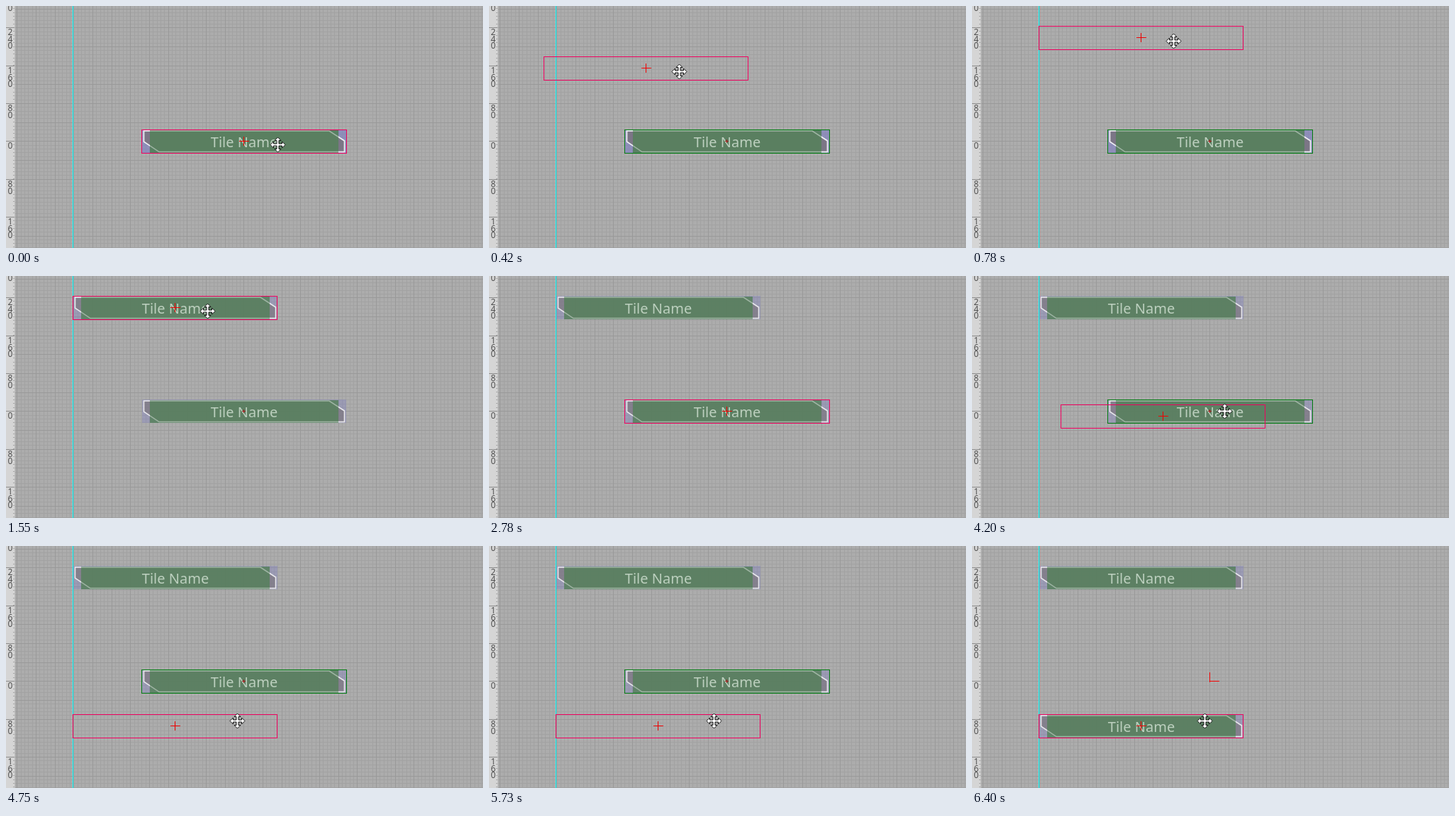
Write an HTML page with a canvas that moves like this. It is 673 px wide and 341 px high and loops after 6790 ms.

```html
<!DOCTYPE html>
<html lang="en">
<head>
<meta charset="utf-8">
<title>Snapping tiles to a guide</title>
<style>
html, body { margin: 0; width: 100%; height: 100%; overflow: hidden; background: #aaa; }
canvas { display: block; }
</style>
</head>
<body>
<canvas id="stage" width="673" height="341"></canvas>
<script>
const ctx = document.getElementById('stage').getContext('2d');
const W = 673, H = 341, LOOP = 6790;
const ORIGIN = { x: 335, y: 190 }, UNIT = 160 / 3, GUIDE = 94;
const HOME = { x: 191, y: 174, w: 289 };
const TOP = { x: GUIDE, y: 28, w: 288 };
const LOW = { x: GUIDE, y: 237, w: 288 };
const PINK = '#f0005f', GREEN = '#007c10', RED = '#f00000';

const linear = p => p;
const easeIn = q => p => p ** q;
const easeOut = q => p => 1 - (1 - p) ** q;
const overshoot = p => 1 + 3.4 * (p - 1) ** 3 + 2.4 * (p - 1) ** 2;

// Each move starts where the last one ended, unless it has its own "from"
const moves = [
  { start: 70, end: 780, from: [383, 195], to: [284, 49], easeX: overshoot, easeY: easeOut(2) },
  { start: 3170, end: 3450, from: [670, -2], to: [423, 182], easeX: easeOut(2), easeY: easeOut(2) },
  { start: 3910, end: 4750, to: [326, 246], easeX: easeOut(2.4), easeY: easeIn(2.2) },
  { start: 5130, end: 5270, to: [308, 246], easeX: linear, easeY: linear },
  { start: 5500, end: 6090, to: [328, 246], easeX: linear, easeY: linear }
];

// The pointer advances in jumps of about 70 ms
function pointerAt(t) {
  let [x, y] = moves[0].from;
  for (const { start, end, from = [x, y], to, easeX, easeY } of moves) {
    if (t < start) break;
    const jumps = Math.round((end - start) / 70);
    const done = Math.min(jumps, Math.floor((t - start) / (end - start) * jumps));
    const p = (done + 1) / (jumps + 1);
    x = Math.round(from[0] + (to[0] - from[0]) * easeX(p));
    y = Math.round(from[1] + (to[1] - from[1]) * easeY(p));
  }
  return { x, y };
}

function dragBox(pointer, grabX, grabY) {
  const x = pointer.x - grabX;
  return { x: Math.abs(x - GUIDE) < 17 ? GUIDE : x, y: pointer.y - grabY, w: 288 };
}

function fill(color, x, y, w, h) {
  ctx.fillStyle = color;
  ctx.fillRect(x, y, w, h);
}

function gridLines(step, color) {
  const first = o => (o + .3) % step;
  for (let x = first(ORIGIN.x); x < W; x += step) fill(color, Math.round(x), 0, 1, H);
  for (let y = first(ORIGIN.y); y < H; y += step) fill(color, 0, Math.round(y), W, 1);
}

function drawRuler() {
  fill('#d5d5d5', 0, 0, 12, H);
  fill('#bdbdbd', 12, 0, 1, H);
  for (let y = ORIGIN.y % (UNIT / 10); y < H; y += UNIT / 10) fill('#a5a5a5', 10, Math.round(y), 2, 1);
  ctx.font = '12px "Noto Sans", sans-serif';
  for (let k = -4; k <= 2; k++) {
    const y = Math.round(ORIGIN.y + .3 + k * UNIT);
    fill('#8c8c8c', 0, y, 12, 1);
    ctx.fillStyle = '#505050';
    [...String(Math.abs(k * 80))].forEach((d, i) => ctx.fillText(d, 6, y + 11 + i * 9.7));
  }
}

function drawBackground() {
  fill('#acacac', 0, 0, W, H);
  gridLines(UNIT / 10, '#a2a2a2');
  gridLines(UNIT / 2, '#999');
  drawRuler();
  fill('#00ffff', GUIDE, 0, 1, H);
}

function drawTile(box) {
  ctx.save();
  ctx.translate(box.x - HOME.x, box.y - HOME.y);
  const bands = new Path2D();
  bands.rect(192, 174, 11, 33);
  bands.rect(469, 174, 11, 33);
  const frame = new Path2D('M194.5 176H456L477.5 190V205.5H216L194.5 191Z');
  fill('rgba(118,118,200,.3)', 192, 174, 288, 33);
  ctx.fillStyle = 'rgba(122,116,122,.65)';
  ctx.fill(frame);
  fill('rgba(86,128,92,.85)', 203, 175, 266, 32);
  ctx.lineWidth = 1.5;
  ctx.strokeStyle = 'rgba(255,255,255,.4)';
  ctx.stroke(frame);
  ctx.clip(bands);
  ctx.strokeStyle = 'rgba(255,255,255,.65)';
  ctx.stroke(frame);
  ctx.restore();
  ctx.font = '20px "Noto Sans", "Open Sans", sans-serif';
  ctx.fillStyle = '#bccfbe';
  ctx.fillText('Tile Name', box.x + 145, box.y + 25);
}

function drawBox({ x, y, w }, color) {
  ctx.lineWidth = 1;
  ctx.strokeStyle = color;
  ctx.strokeRect(x + .5, y + .5, w, 33);
}

function drawSelection(box) {
  drawBox(box, PINK);
  const x = box.x + 144, y = box.y + 16;
  fill(RED, x, y - 6, 1, 13);
  fill(RED, x - 6, y, 14, 1);
}

function drawOrigin(uncovered) {
  const { x, y } = ORIGIN;
  if (uncovered) {
    fill(RED, x, y - 12, 1, 14);
    fill(RED, x, y, 14, 1);
  } else {
    fill('#a01818', x, y - 2, 1, 5);
    fill('#a01818', x - 2, y, 5, 1);
  }
}

function drawPointer({ x, y }) {
  const arrows = new Path2D(
    'M0-10.5L4.5-6H1.5V-1.5H6V-4.5L10.5 0L6 4.5V1.5H1.5V6H4.5L0 10.5L-4.5 6H-1.5V1.5H-6V4.5L-10.5 0L-6-4.5V-1.5H-1.5V-6H-4.5Z');
  ctx.save();
  ctx.translate(x + .5, y + .5);
  ctx.lineWidth = 1;
  ctx.fillStyle = '#fff';
  ctx.strokeStyle = '#111';
  ctx.fill(arrows);
  ctx.stroke(arrows);
  ctx.restore();
}

function draw(t) {
  const pointer = pointerAt(t);
  const within = (from, to) => t >= from && t < to;
  const firstDrag = within(70, 1550), secondDrag = within(3910, 6400);
  const firstMoved = t >= 1550, bothMoved = t >= 6400;

  drawBackground();
  // Two tiles lie on top of each other until the first is dropped
  [firstMoved ? TOP : HOME, bothMoved ? LOW : HOME].forEach(drawTile);
  drawOrigin(bothMoved);

  if (firstDrag || secondDrag) drawBox(HOME, GREEN);
  if (firstDrag) drawSelection(dragBox(pointer, 191, 21));
  else if (secondDrag) drawSelection(dragBox(pointer, 231, 9));
  else if (bothMoved) drawSelection(LOW);
  else drawSelection(within(1550, 2780) ? TOP : HOME);

  if (!within(1930, 3170) && !within(4980, 5130)) drawPointer(pointer);
}

ctx.textAlign = 'center';
const start = performance.now();
function tick() {
  draw((performance.now() - start) % LOOP);
  requestAnimationFrame(tick);
}
tick();
</script>
</body>
</html>
```
